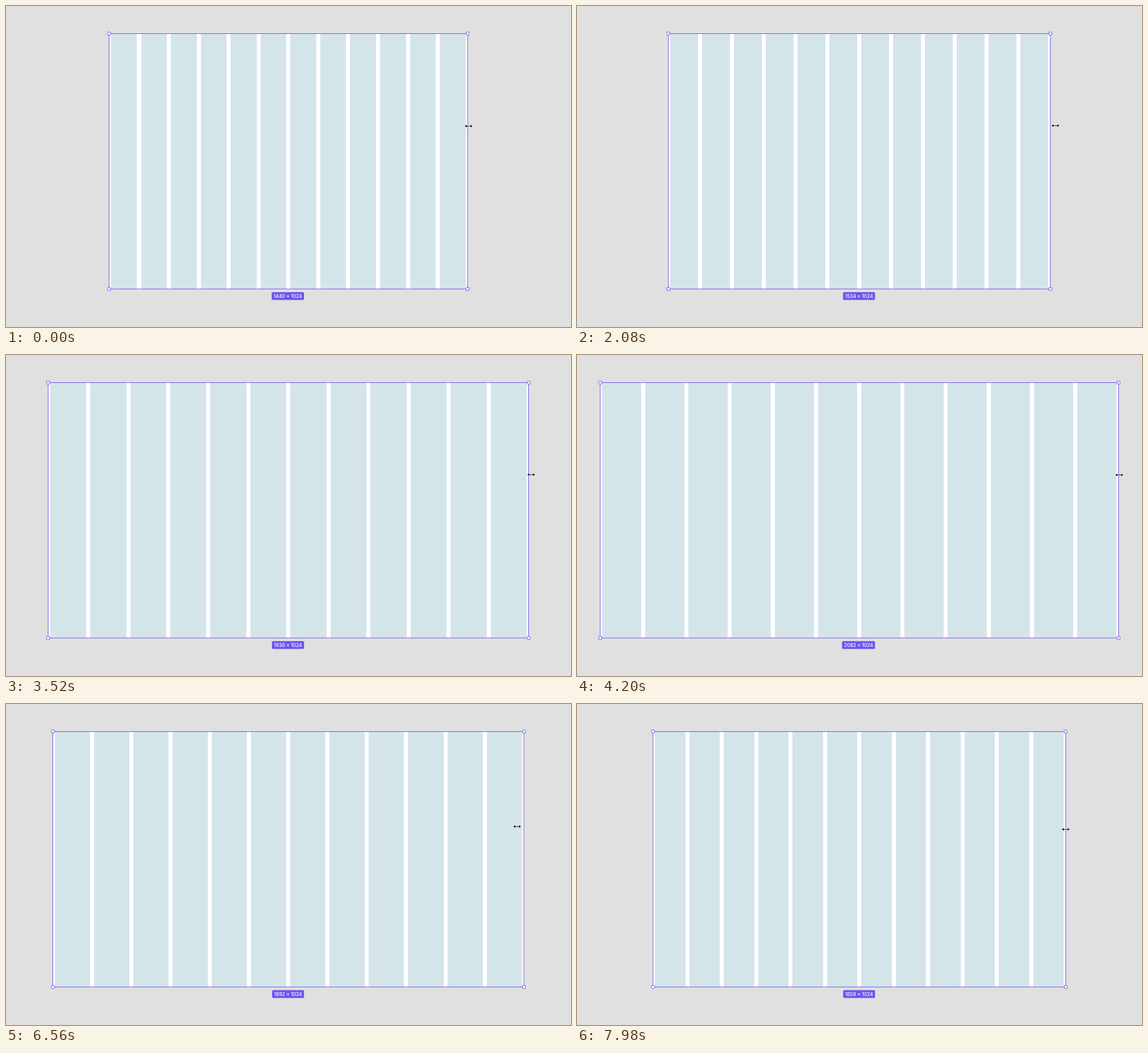
Recreate the animation shown at these times as an HTML page. Size 994 px wide and 564 px high, loop 8 s.

```html
<!DOCTYPE html>
<html lang="en">
<head>
<meta charset="utf-8">
<title>Resizing a column grid</title>
<style>
  html, body { margin: 0; width: 100%; height: 100%; overflow: hidden; background: #e0e0e0; }
  svg { display: block; width: 100%; height: 100%; }
  .col { fill: #d4e5ea; shape-rendering: crispEdges; }
  .line { fill: none; stroke: #7457ea; stroke-width: 1.05; }
  .handle { fill: #fff; stroke: #7457ea; }
  .label { fill: #6f52ee; }
  text { font: 500 8.5px Inter, Roboto, sans-serif; fill: #fff; text-anchor: end; }
  .cursor { fill: #000; stroke: #fff; stroke-width: 1.3; stroke-linejoin: round; paint-order: stroke;
            filter: drop-shadow(0 .7px .6px rgba(0, 0, 0, .3)); }
</style>
</head>
<body>
<svg id="stage" viewBox="0 0 994 564"></svg>
<script>
const LOOP = 8000, SCALE = 0.438, MID = 496.8, TOP = 48.5, BOTTOM = 497.2, COLS = 12;
const MARGIN = 8 * SCALE, PAD = 3.4, LABEL_END = 524.3;

// Drag: [step, frame width in units, pointer's lead over the edge]
const KEYS = [
  [24, 1440, 1.8], [45, 1534, 9], [62, 1796, 2], [77, 1930, 4.5], [95, 2096, 0.8],
  [113, 2096, 0.8], [120, 2054, -0.6], [141, 1892, -12], [150, 1732, 0], [172, 1658, 0]
];

const stage = document.getElementById('stage');

function set(el, attrs) {
  for (const k in attrs) el.setAttribute(k, attrs[k]);
}

function add(name, attrs) {
  const el = document.createElementNS('http://www.w3.org/2000/svg', name);
  set(el, attrs);
  return stage.appendChild(el);
}

const span = { y: TOP, height: BOTTOM - TOP };
const sheet = add('rect', { fill: '#fff', ...span });
const cols = Array.from({ length: COLS }, () => add('rect', { class: 'col', ...span }));
const line = add('rect', { class: 'line', ...span });
const handles = [TOP, TOP, BOTTOM, BOTTOM].map(y =>
  add('rect', { class: 'handle', y: y - 2.6, width: 5.2, height: 5.2, rx: 0.5 }));
const label = add('rect', { class: 'label', y: 502.8, height: 13.6, rx: 2 });
const text = add('text', { x: LABEL_END - PAD, y: 512.7 });
const cursor = add('path', {
  class: 'cursor',
  d: 'M-6.6 0L-3.6-2.4V-.5H3.6V-2.4L6.6 0L3.6 2.4V.5H-3.6V2.4Z'
});

// The picture advances in uneven beats: 20, 20 and 100 ms.
function stepAt(t) {
  const u = t + 20;
  return Math.floor(u / 140) * 3 + Math.min(2, Math.floor(u % 140 / 20));
}

function slope(i, c) {
  const a = KEYS[i - 1], b = KEYS[i], d = KEYS[i + 1];
  if (!a || !d) return 0;
  const l = (b[c] - a[c]) / (b[0] - a[0]), r = (d[c] - b[c]) / (d[0] - b[0]);
  return l * r > 0 ? 2 * l * r / (l + r) : 0;
}

// Monotone cubic through the keys
function valueAt(n, c) {
  let i = 0;
  while (i < KEYS.length - 2 && n >= KEYS[i + 1][0]) i++;
  const a = KEYS[i], b = KEYS[i + 1], h = b[0] - a[0];
  const u = Math.min(1, Math.max(0, (n - a[0]) / h)), v = 1 - u;
  return a[c] * v * v * (1 + 2 * u) + b[c] * u * u * (3 - 2 * u)
    + h * u * v * (slope(i, c) * v - slope(i + 1, c) * u);
}

function draw(n) {
  const units = 2 * Math.round(valueAt(n, 1) / 2);
  const width = units * SCALE, left = MID - width / 2, pitch = width / COLS;

  set(sheet, { x: left, width });
  set(line, { x: left, width });
  cols.forEach((c, i) => set(c, { x: left + i * pitch + MARGIN, width: pitch - 2 * MARGIN }));
  handles.forEach((h, i) => set(h, { x: left + (i % 2) * width - 2.6 }));

  text.textContent = units + ' × 1024';
  const w = text.getComputedTextLength() + 2 * PAD;
  set(label, { x: LABEL_END - w, width: w });

  const x = left + width + valueAt(n, 2);
  const y = 210 + ((Math.max(n, KEYS[0][0]) - 60) / 35) ** 2;
  set(cursor, { transform: `translate(${x} ${y})` });
}

let last = -1;
function tick() {
  const n = stepAt(performance.now() % LOOP);
  if (n !== last) draw(last = n);
  requestAnimationFrame(tick);
}
tick();
</script>
</body>
</html>
```
